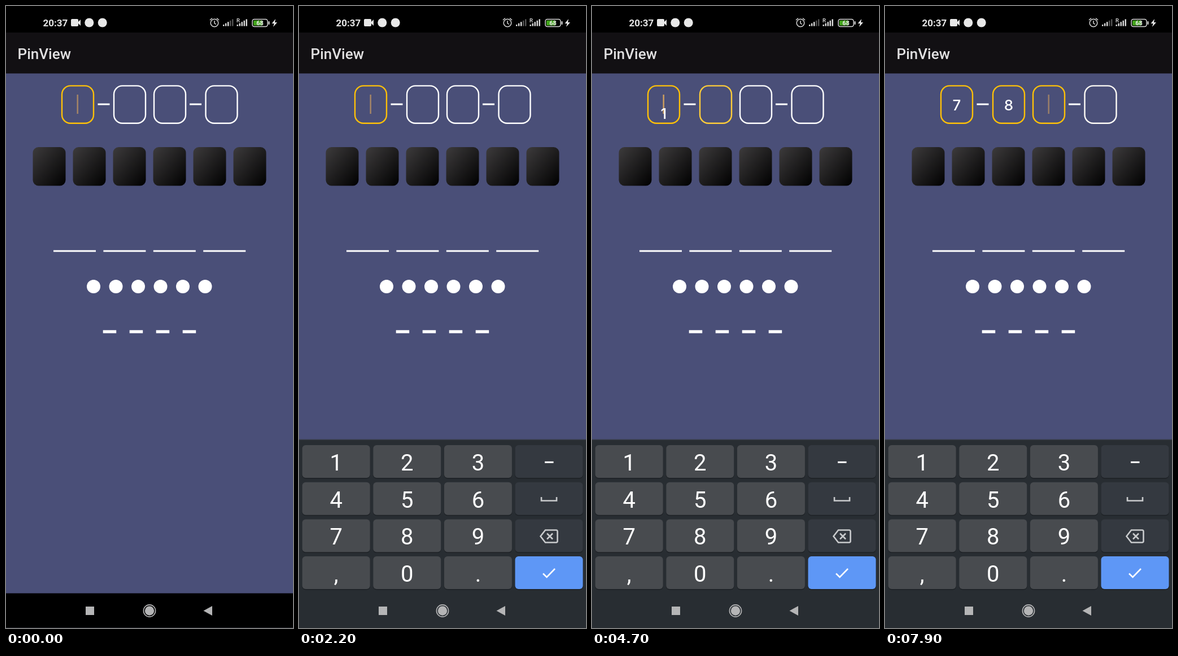
Animation, 508 px wide and 1102 px high, one loop 8 s. Source, as an HTML page:

```html
<!DOCTYPE html>
<html lang="en">
<head>
<meta charset="utf-8">
<title>PinView</title>
<style>
  html, body { margin: 0; width: 100%; height: 100%; overflow: hidden; background: #000; }
  svg { display: block; width: 508px; height: 1102px; font-family: Roboto, sans-serif; }
  .digit { font: 500 26px Inter, sans-serif; fill: #fff; text-anchor: middle; }
  .key { font-size: 40px; fill: #fff; text-anchor: middle; }
  .icon { fill: none; stroke: #c9cbcd; stroke-width: 2.6; }
</style>
</head>
<body>
<svg id="stage" viewBox="0 0 508 1102">
  <defs>
    <linearGradient id="tile" x1="0" y1="0" x2="1" y2="1">
      <stop offset="0" stop-color="#3d3b3c"/>
      <stop offset="1" stop-color="#000"/>
    </linearGradient>
    <clipPath id="inside"><rect x="90" y="140" width="330" height="68.5"/></clipPath>
  </defs>
  <rect width="508" height="1102"/>
  <rect y="47" width="508" height="73" fill="#121013"/>
  <rect y="119.5" width="508" height="921" fill="#4a4f78"/>
  <text x="20.5" y="94" font-size="26" font-weight="500" fill="#e1e0e1">PinView</text>

  <g id="status" fill="#e8e8e8">
    <text x="65.5" y="35.5" font-size="17" font-weight="700">20:37</text>
    <path d="M117 23h9q2 0 2 2v3l4-4v11l-4-4v3q0 2-2 2h-9q-2 0-2-2v-9q0-2 2-2z"/>
    <circle cx="147.300" cy="29.500" r="8"/>
    <circle cx="170.700" cy="29.500" r="8"/>
    <g fill="none" stroke="#d8d8d8" stroke-width="1.500">
      <circle cx="369" cy="30" r="6.800"/>
      <path d="M369 26v4.500l3 2M361 25l4-3.500M377 25l-4-3.500"/>
      <rect x="436" y="23.500" width="27" height="13" rx="3.500"/>
    </g>
    <rect x="464.500" y="27" width="2" height="6" rx="1"/>
    <rect x="438" y="25.500" width="16" height="9" rx="1.500" fill="#43a51c"/>
    <text x="449.500" y="34" font-size="11" font-weight="700" text-anchor="middle">68</text>
    <text x="408" y="29" font-size="9.500" font-weight="500">R</text>
    <path d="M477 23l-6.500 8h4l-1.500 6 7-8h-4z"/>
  </g>

  <g id="view" fill="#fff"></g>
  <g id="boxes" fill="none" stroke-width="2.4"></g>
  <rect id="cursor" y="157" width="2.6" height="34" fill="#c79a60"/>
  <g id="digits" clip-path="url(#inside)"></g>
  <g id="keyboard">
    <rect y="768" width="508" height="334" fill="#282d32"/>
    <rect y="767.500" width="508" height="1.500" fill="#3a3f4c"/>
  </g>
  <g id="nav" fill="#b5b5b6">
    <rect x="141" y="1064" width="15" height="15"/>
    <circle cx="254" cy="1071.500" r="8.200"/>
    <circle cx="254" cy="1071.500" r="10.600" fill="none" stroke="#b5b5b6" stroke-width="1.600"/>
    <path d="M349.500 1071.500L365 1063v17z"/>
  </g>
</svg>
<script>
const LOOP = 8000, BACK = '<';
const WHITE = [255, 255, 255], GOLD = [255, 193, 7];
const BOX_X = [99, 191, 262, 353.5];
const SLIDE = 330, FADE = 280, DROP = 50;

// time of entry, key
const TYPED = [
  [2600, '1'], [2862, '2'], [3050, '3'], [3150, '5'],
  [4020, BACK], [4220, BACK], [4390, BACK], [4645, BACK],
  [5400, '7'], [5680, '8'], [6300, '9'], [6530, BACK], [6780, '9'], [7630, BACK]
];

const $ = id => document.getElementById(id);
const clamp = v => Math.min(1, Math.max(0, v));
const easeOut = p => 1 - (1 - clamp(p)) ** 2;

function add(parent, tag, attrs, text = '') {
  const el = document.createElementNS('http://www.w3.org/2000/svg', tag);
  for (const name in attrs) el.setAttribute(name, attrs[name]);
  el.textContent = text;
  parent.append(el);
  return el;
}
const rect = (parent, x, y, width, height, more = {}) =>
  add(parent, 'rect', { x, y, width, height, ...more });

function buildView() {
  const view = $('view');
  rect(view, 162.5, 172.6, 21, 3);
  rect(view, 325, 172.6, 21, 3);
  for (let i = 0; i < 6; i++) {
    rect(view, 47.5 + 71 * i, 250, 58, 68.5, { rx: 10, fill: 'url(#tile)' });
    add(view, 'circle', { cx: 155 + 39.5 * i, cy: 497, r: 12 });
  }
  for (let i = 0; i < 4; i++) {
    rect(view, 84 + 88.4 * i, 432.6, 75, 3);
    rect(view, 171.7 + 47 * i, 574.3, 23.5, 5.4);
  }
  for (const x of [384, 408.5])
    for (let i = 0; i < 5; i++)
      rect($('status'), x + 4 * i, 33 - 2.4 * i, 2.4, 2.6 + 2.4 * i,
        { fill: i < 3 || x > 400 ? '#e0e0e0' : '#555' });
}

function buildKeys() {
  const keys = {}, board = $('keyboard');
  ['123-', '456_', '789<', ',0.+'].forEach((row, r) => [...row].forEach((name, c) => {
    const x = 5.7 + 125.6 * c, y = 778 + 65.7 * r;
    const fill = name === '+' ? '#5e97f6' : c === 3 ? '#343940' : '#484b4f';
    const lit = c === 3 ? '#484d53' : '#5b5e60';
    rect(board, x, y + 1.5, 120, 58, { rx: 6, fill: '#1d2125' });
    keys[name] = { el: rect(board, x, y, 120, 58, { rx: 6, fill }), fill, lit };
    if (c < 3) add(board, 'text', { class: 'key', x: x + 60, y: y + 45 }, name);
  }));
  const icon = (d, more) => add(board, 'path', { class: 'icon', d, ...more });
  icon('M435 808.3h15.500', { style: 'stroke:#fff;stroke-width:3' });
  icon('M429 870v6.500h27v-6.500');
  icon('M436 928.500h19q2.500 0 2.500 2.500v17q0 2.500-2.500 2.500h-19l-8.500-11zM439 934.500l10 10m0-10l-10 10');
  icon('M432 1005.500l6.500 6.500 14.500-15', { style: 'stroke:#fff' });
  return keys;
}

buildView();
const keys = buildKeys();
const boxes = BOX_X.map(x => rect($('boxes'), x, 141.4, 56, 66.4, { rx: 15 }));
const digits = BOX_X.map(x => add($('digits'), 'text', { class: 'digit', x: x + 28 }));

function replay(t) {
  const slots = BOX_X.map((_, i) => ({ char: '', shown: false, at: -LOOP, gold: i === 0, turned: -LOOP }));
  let count = 0, moved = 450 - 1000;
  for (const [at, key] of TYPED) {
    if (at > t) break;
    if (key === BACK) {
      if (count < 4) Object.assign(slots[count], { gold: false, turned: at });
      Object.assign(slots[--count], { shown: false, at });
    } else {
      Object.assign(slots[count++], { char: key, shown: true, at });
      if (count < 4) Object.assign(slots[count], { gold: true, turned: at });
    }
    moved = at;
  }
  return { slots, count, moved };
}

function blink(dt) {
  const wave = Math.abs(1 - 2 * (dt / 1000 % 1));
  return clamp(1.7 * wave - 0.15);
}

function draw(t) {
  const { slots, count, moved } = replay(t);

  slots.forEach((s, i) => {
    const mix = clamp((t - s.turned) / FADE), g = s.gold ? mix : 1 - mix;
    boxes[i].setAttribute('stroke', `rgb(${WHITE.map((w, k) => Math.round(w + (GOLD[k] - w) * g))})`);
    const p = easeOut((t - s.at) / SLIDE);
    digits[i].textContent = s.char;
    digits[i].setAttribute('y', 184.5 + DROP * (s.shown ? 1 - p : p));
  });

  const cursor = $('cursor');
  cursor.setAttribute('opacity', count > 3 ? 0 : t < 400 ? 0.7 : blink(t - moved));
  if (count < 4) cursor.setAttribute('x', BOX_X[count] + 26.4);

  for (const name in keys) {
    const { el, fill, lit } = keys[name];
    const down = name !== '1' && TYPED.some(([at, key]) => key === name && t >= at - 90 && t < at + 30);
    el.setAttribute('fill', down ? lit : fill);
  }

  const rise = easeOut((t - 1450) / 330);
  $('keyboard').setAttribute('transform', `translate(0 ${334 * (1 - rise)})`);
  $('nav').setAttribute('opacity', 1);
}

function tick(now) {
  draw(now % LOOP);
  requestAnimationFrame(tick);
}
draw(0);
requestAnimationFrame(tick);
</script>
</body>
</html>
```
